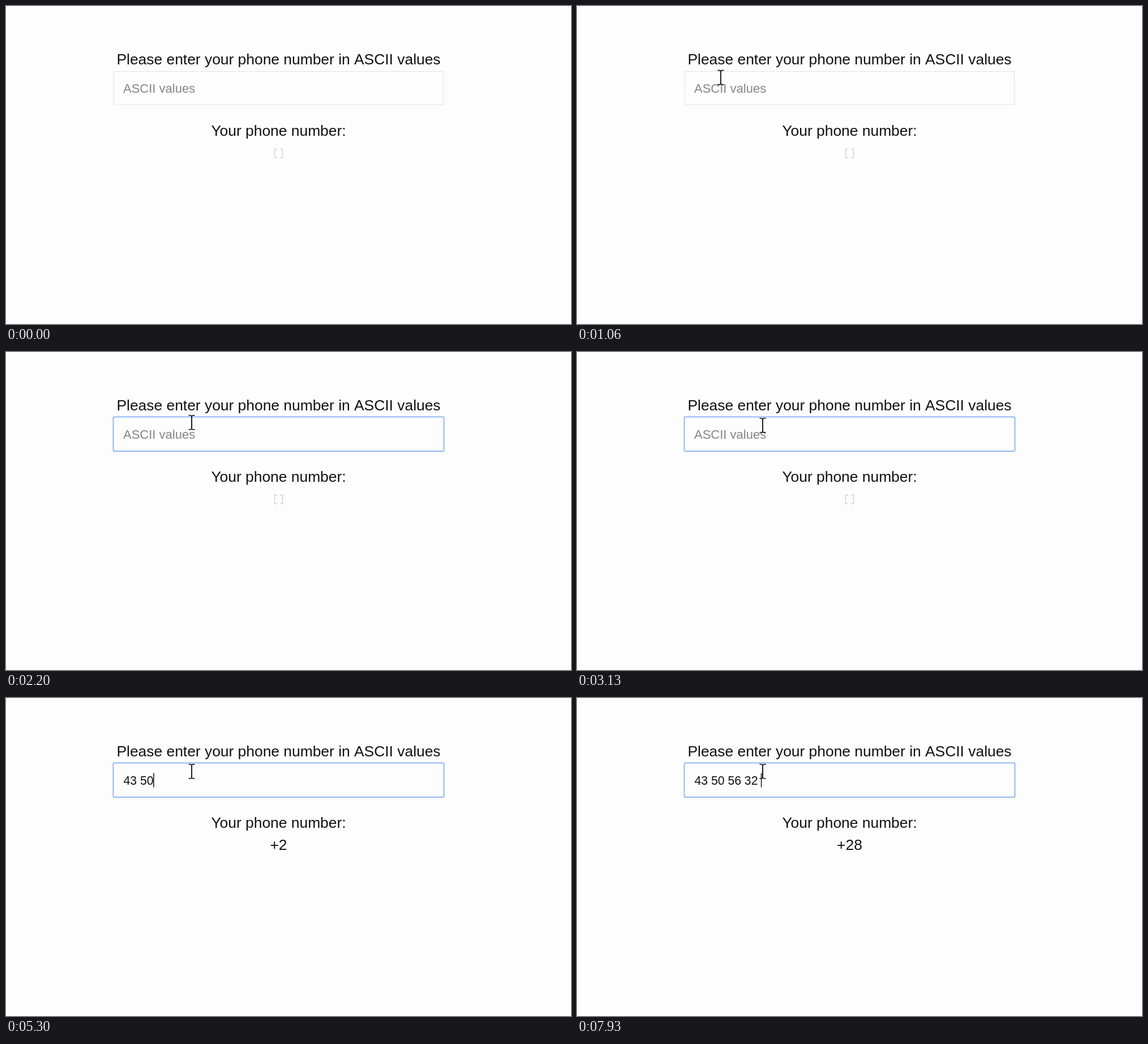
Recreate the animation shown at these times as an HTML page with a canvas. Size 998 px wide and 561 px high, loop 8 s.

```html
<!DOCTYPE html>
<html lang="en">
<head>
<meta charset="utf-8">
<title>ASCII phone number</title>
<style>
  html, body { margin: 0; width: 100%; height: 100%; overflow: hidden; background: #fdfdfd; }
  canvas { display: block; }
</style>
</head>
<body>
<canvas id="stage" width="998" height="561"></canvas>
<script>
const ctx = document.getElementById("stage").getContext("2d");
const LOOP = 8000, BLINK = 300, FOCUS = 1660, CENTER = 481.5;
const BOX = "\u25af"; // stands for an unprintable character

// time, field value, decoded result, start of the caret blink if it differs
const KEYS = [
  [0, "", BOX, 1630],
  [3530, "4", BOX],
  [3830, "43", "+"],
  [4200, "43 ", "+" + BOX],
  [4600, "43 5", "+" + BOX],
  [5130, "43 50", "+2"],
  [6400, "43 50 ", "+2" + BOX],
  [6600, "43 50 5", "+2" + BOX],
  [6770, "43 50 56", "+28"],
  [6900, "43 50 56 ", "+28" + BOX],
  [7080, "43 50 56 3", "+28" + BOX],
  [7230, "43 50 56 32", "+28"],
  [7500, "43 50 56 32 ", "+28", 7330]
];

const setFont = size => ctx.font = size + "px 'Liberation Sans', Arial, sans-serif";
const progress = (t, from, to) => Math.min(1, Math.max(0, (t - from) / (to - from)));
const mix = (a, b, u) => a + (b - a) * u;

function text(str, x, y, size, color = "#111", align = "left") {
  setFont(size);
  ctx.fillStyle = color;
  ctx.textAlign = align;
  ctx.fillText(str, x, y);
}

function line(points, color, width) {
  ctx.beginPath();
  points.forEach(([x, y]) => ctx.lineTo(x, y));
  ctx.strokeStyle = color;
  ctx.lineWidth = width;
  ctx.stroke();
}

function drawField(focused) {
  ctx.beginPath();
  if (focused) {
    ctx.roundRect(189.5, 114.5, 584, 60.5, 2);
    ctx.strokeStyle = "#91b8f6";
    ctx.lineWidth = 2;
    ctx.stroke();
  } else {
    ctx.setLineDash([1.3, 1.3]);
    ctx.rect(190.5, 115.5, 582, 58.5);
    ctx.strokeStyle = "#c8c8c8";
    ctx.lineWidth = 1;
    ctx.stroke();
    ctx.setLineDash([]);
  }
}

function drawResult(result) {
  const hasBox = result.endsWith(BOX), boxWidth = 20;
  const digits = result.replace(BOX, "");
  setFont(26.4);
  const digitsWidth = ctx.measureText(digits).width;
  const left = CENTER - (digitsWidth + (hasBox ? boxWidth : 0)) / 2;
  text(digits, left, 268, 26.4);
  if (!hasBox) return;
  const x = left + digitsWidth + 3;
  line([[x + 4, 252.5], [x, 252.5], [x, 267.5], [x + 4, 267.5]], "#cfc9d6", 1.3);
  line([[x + 10, 252.5], [x + 14, 252.5], [x + 14, 267.5], [x + 10, 267.5]], "#cfc9d6", 1.3);
}

function drawIBeam(x, y) {
  for (const side of [-1, 1]) {
    const end = y + side * 12.5, bend = y + side * 11;
    line([[x - 5.5, end], [x - 1.5, end], [x, bend], [x + 1.5, end], [x + 5.5, end]], "#111", 1.6);
  }
  line([[x, y - 11], [x, y + 11]], "#111", 1.9);
}

function drawArrow(x, y) {
  ctx.beginPath();
  [[0, 0], [0, 21], [5, 17], [8, 25], [12, 23], [8, 15], [15, 15]]
    .forEach(([dx, dy]) => ctx.lineTo(x + dx, y + dy));
  ctx.closePath();
  ctx.fillStyle = "#fff";
  ctx.fill();
  ctx.strokeStyle = "#111";
  ctx.lineWidth = 1.3;
  ctx.stroke();
}

function drawPointer(t) {
  if (t < 860) return;
  const u = 1 - (1 - progress(t, 860, 1630)) ** 4.6;
  const x = mix(30, 328, u);
  let y = mix(131, 124.5, u);
  y = mix(y, 119.5, progress(t, 2190, 2370));
  y = mix(y, 129.5, progress(t, 2370, 2600));
  if (x < 190) drawArrow(x, y);
  else drawIBeam(x, y);
}

function draw(t) {
  ctx.fillStyle = "#fdfdfd";
  ctx.fillRect(0, 0, 998, 561);
  text("Please enter your phone number in ASCII values", CENTER, 102.5, 26.4, "#111", "center");
  text("Your phone number:", CENTER, 228.5, 26.4, "#111", "center");

  const focused = t >= FOCUS;
  const [time, value, result, blinkStart = time] = KEYS.findLast(key => t >= key[0]);
  drawField(focused);
  if (value) text(value, 207.5, 152.5, 21.2);
  else text("ASCII values", 207, 152.5, 22, "#858585");
  drawResult(result);

  if (focused && Math.floor((t - blinkStart) / BLINK) % 2 === 0) {
    setFont(21.2);
    const x = 207.8 + ctx.measureText(value).width;
    line([[x, 132.5], [x, 157.5]], "#111", 1.5);
  }
  drawPointer(t);
}

function tick() {
  draw(performance.now() % LOOP);
  requestAnimationFrame(tick);
}
tick();
</script>
</body>
</html>
```
